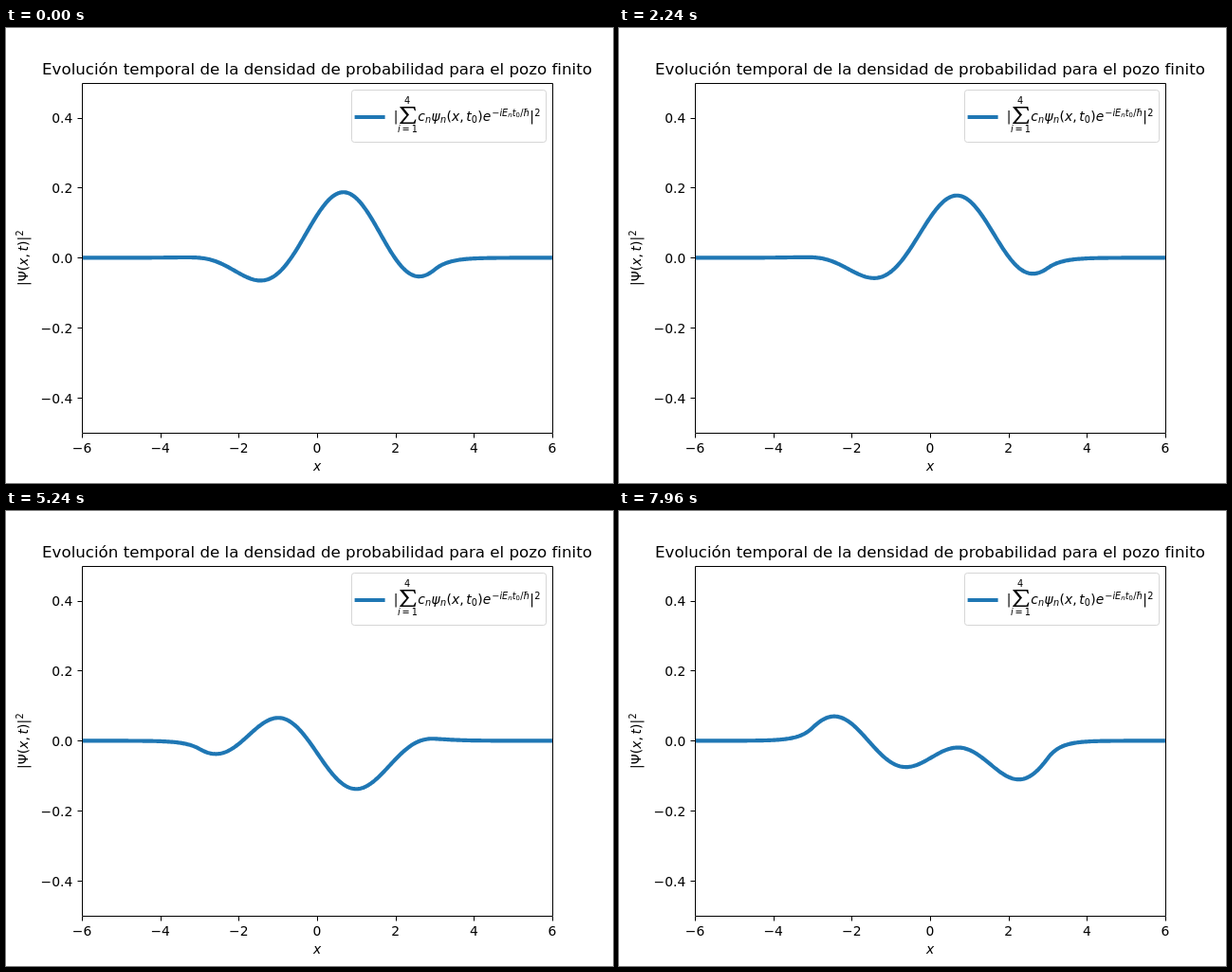
An HTML page for the animation above (8 s loop, 640x480 px).

```html
<!DOCTYPE html>
<html lang="es">
<head>
<meta charset="utf-8">
<style>
  html, body { margin: 0; width: 100%; height: 100%; overflow: hidden; background: #fff; }
  svg { display: block; width: 640px; height: 480px; }
  text { font: 13.89px "DejaVu Sans", sans-serif; white-space: pre; }
</style>
</head>
<body>
<svg id="plot" viewBox="0 0 640 480">
  <clipPath id="area"><rect x="80" y="57.6" width="496" height="369.6"/></clipPath>
  <path id="wave" clip-path="url(#area)" fill="none" stroke="#1f77b4" stroke-width="4.17" stroke-linejoin="round"/>
  <path id="axes" fill="none" stroke="#000"/>
  <text x="328" y="49.2" text-anchor="middle" style="font-size:16.67px">Evolución temporal de la densidad de probabilidad para el pozo finito</text>
  <rect x="364.5" y="65.5" width="205" height="55" rx="2.8" fill="#fff" stroke="#ccc" stroke-opacity=".8"/>
  <path d="M367.6 94H399.6" stroke="#1f77b4" stroke-width="4.17"/>
  <path id="sum" d="M415.3 83H431.3L432 87.2H431L429.6 84.4H419.2L425 91.6L418.4 99.4H429.8L431.4 96.4H432.4L431.4 101H415V100.4L422.3 92L415.3 83.6Z"/>
  <g id="legend"></g>
  <g id="yLabel" transform="translate(23 272) rotate(-90)"></g>
</svg>
<script>
const $ = id => document.getElementById(id);
const FRAME_MS = 40, FRAMES = 200;
const SMALL = 9.72, TINY = 6.8;

const toX = x => 328 + x * 496 / 12;
const toY = y => 242.4 - y * 369.6;
const snap = v => Math.round(v) + .5;

function addText(parent, str, x, y, { italic = false, size = 13.89, anchor = 'start' } = {}) {
  const el = document.createElementNS('http://www.w3.org/2000/svg', 'text');
  el.textContent = str;
  el.setAttribute('x', x);
  el.setAttribute('y', y);
  el.setAttribute('text-anchor', anchor);
  el.style.fontSize = size + 'px';
  if (italic) el.style.fontStyle = 'oblique';
  parent.append(el);
}

// Letters are slanted, digits and signs stay upright
function addMath(parent, baseline, size, glyphs) {
  for (const [str, x] of glyphs)
    addText(parent, str, x, baseline, { size, italic: /[a-zħψE]/.test(str) });
}

function drawAxes() {
  const svg = $('plot');
  const minus = s => s.replace('-', '\u2212');
  let d = `M80.5 ${snap(57.6)}H576.5V427.5H80.5Z`;
  for (let v = -6; v <= 6; v += 2) {
    d += `M${snap(toX(v))} 428v4.5`;
    addText(svg, minus(String(v)), toX(v), 448, { anchor: 'middle' });
  }
  for (let i = -2; i <= 2; i++) {
    const y = toY(i / 5);
    d += `M80 ${snap(y)}h-4.5`;
    addText(svg, minus((i / 5).toFixed(1)), 70.3, Math.round(y + 5.3), { anchor: 'end' });
  }
  $('axes').setAttribute('d', d);
  addText(svg, 'x', 328, 467, { italic: true, anchor: 'middle' });
}

function drawLabels() {
  const legend = $('legend'), yLabel = $('yLabel');
  addMath(legend, 98, 13.89, [['|', 408.8], ['c', 434.3], ['ψ', 448.6], ['(', 464.5], ['x', 470],
    [',', 478.2], ['t', 485.3], [')', 497.3], ['e', 502.7], ['|', 552.3]]);
  addMath(legend, 100.4, SMALL, [['n', 442], ['n', 457.9], ['0', 490.8]]);
  addMath(legend, 92.8, SMALL, [['\u2212', 512.2], ['i', 520.4], ['E', 523.1], ['t', 533.8],
    ['/', 542.2], ['ħ', 545.5], ['2', 557.2]]);
  addMath(legend, 94.4, TINY, [['n', 529.2], ['0', 537.6]]);
  addMath(legend, 80, SMALL, [['4', 420]]);
  addMath(legend, 110, SMALL, [['i', 413], ['=', 417.6], ['1', 427.8]]);

  addMath(yLabel, 0, 13.89, [['|', 0], ['Ψ', 4.7], ['(', 15.7], ['x', 21.2], [',', 29.4],
    ['t', 36.5], [')', 42], ['|', 47.4]]);
  addMath(yLabel, -5.3, SMALL, [['2', 52.5]]);
}

// Bound states of a finite well: trigonometric inside, exponential tails outside
const DEPTH = 6, WALL = 3.0045, AMPLITUDE = 0.0608;
const strength = WALL * Math.sqrt(2 * DEPTH);

function boundState(n) {
  let z = n * Math.PI / 2;
  for (let i = 0; i < 40; i++) z = n * Math.PI / 2 - Math.asin(z / strength);
  const k = z / WALL;
  const energy = k * k / 2;
  const kappa = Math.sqrt(2 * (DEPTH - energy));
  const inside = n % 2 ? x => Math.cos(k * x) : x => Math.sin(k * x);
  const psi = x => {
    const out = Math.abs(x) - WALL;
    return out < 0 ? inside(x) : inside(Math.sign(x) * WALL) * Math.exp(-kappa * out);
  };
  return { energy, psi };
}
const states = [1, 2, 3, 4].map(boundState);

const SAMPLES = 400;
const grid = Array.from({ length: SAMPLES + 1 }, (_, i) => {
  const x = -6 + 12 * i / SAMPLES;
  return { px: toX(x).toFixed(2), psi: states.map(s => s.psi(x)) };
});

function drawWave(t) {
  const weights = states.map(s => AMPLITUDE * Math.cos(s.energy * t));
  const points = grid.map(({ px, psi }) => {
    const value = psi.reduce((sum, p, i) => sum + p * weights[i], 0);
    return `${px} ${toY(value).toFixed(2)}`;
  });
  $('wave').setAttribute('d', 'M' + points.join('L'));
}

drawAxes();
drawLabels();
drawWave(0);

const start = performance.now();
function tick() {
  drawWave(Math.floor((performance.now() - start) / FRAME_MS) % FRAMES);
  requestAnimationFrame(tick);
}
requestAnimationFrame(tick);
</script>
</body>
</html>
```
